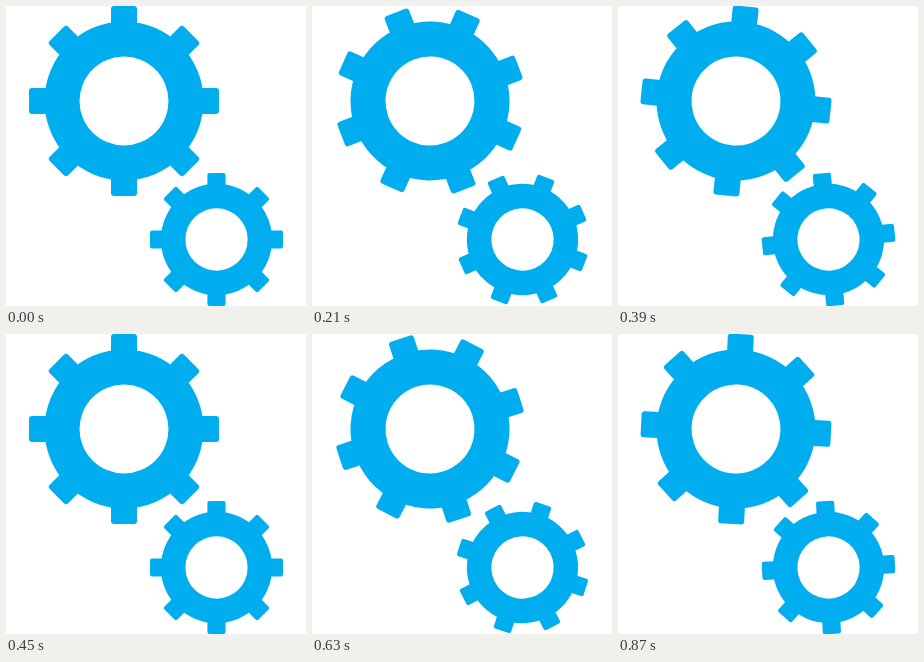
Write an HTML page that moves like this. It is 300 px wide and 300 px high and loops after 0.9 s.

```html
<!DOCTYPE html>
<html lang="en">
<head>
<meta charset="utf-8">
<title>Turning gears</title>
<style>
  html, body { margin: 0; width: 100%; height: 100%; overflow: hidden; background: #fff; }
  svg { display: block; width: 100%; height: 100%; }
</style>
</head>
<body>
<svg viewBox="0 0 300 300">
  <defs>
    <rect id="bar" x="-13" y="-95" width="26" height="190" rx="3"/>
    <g id="gear" fill="#00aeef">
      <use href="#bar"/>
      <use href="#bar" transform="rotate(45)"/>
      <use href="#bar" transform="rotate(90)"/>
      <use href="#bar" transform="rotate(135)"/>
      <circle r="79.5"/>
      <circle r="44.5" fill="#fff"/>
    </g>
  </defs>
  <g transform="translate(118 95)"><use id="large" href="#gear"/></g>
  <g transform="translate(210.5 233.5) scale(.7)"><use id="small" href="#gear"/></g>
</svg>
<script>
  const LOOP = 900, STEP = 30, DEGREES_PER_STEP = 3;
  const large = document.getElementById('large');
  const small = document.getElementById('small');

  function draw() {
    const step = Math.floor((performance.now() % LOOP) / STEP);
    const angle = step * DEGREES_PER_STEP;
    large.setAttribute('transform', `rotate(${-angle})`);
    small.setAttribute('transform', `rotate(${angle})`);
    requestAnimationFrame(draw);
  }
  draw();
</script>
</body>
</html>
```
